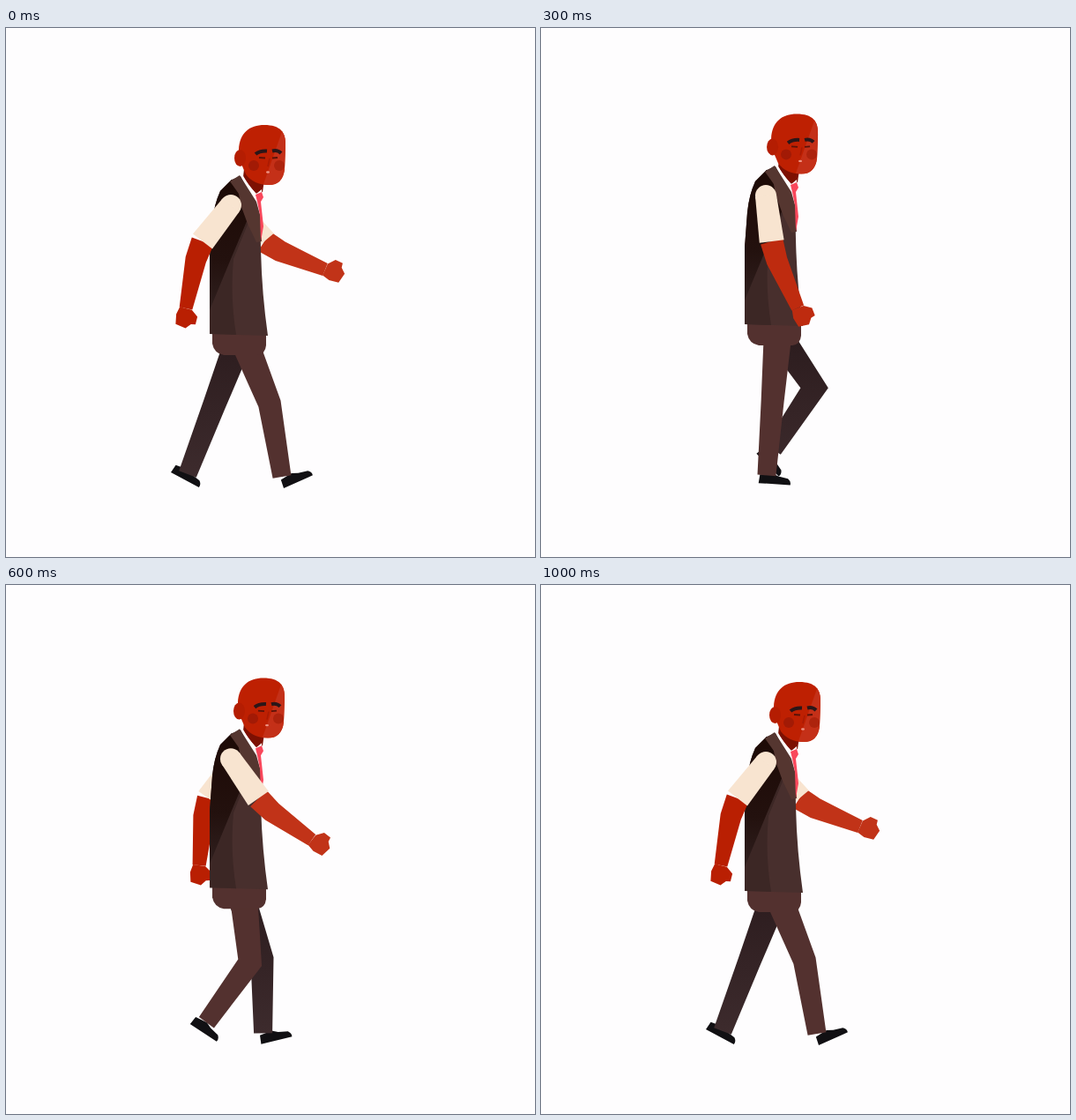
Recreate the animation shown at these times as an HTML page. Size 600x600 px, loop 1100 ms.

```html
<!DOCTYPE html>
<html lang="en">
<head>
<meta charset="utf-8">
<title>Walk cycle</title>
<style>
  html, body { margin: 0; width: 100%; height: 100%; overflow: hidden; background: #fefdfe; }
  svg { display: block; width: 100vw; height: 100vh; }
</style>
</head>
<body>
<svg viewBox="0 0 600 600">
  <defs>
    <linearGradient id="farCloth" gradientUnits="userSpaceOnUse" x1="0" y1="360" x2="0" y2="510">
      <stop offset="0" stop-color="#2d1d1f"/><stop offset="1" stop-color="#3d2b2d"/>
    </linearGradient>
    <linearGradient id="shade" gradientUnits="userSpaceOnUse" x1="0" y1="175" x2="0" y2="322">
      <stop offset="0" stop-color="#1d0a06"/><stop offset=".6" stop-color="#23110e"/><stop offset="1" stop-color="#30201f"/>
    </linearGradient>
    <clipPath id="skull"><use href="#headShape"/></clipPath>
  </defs>

  <g id="farArm"></g>
  <g id="farLeg" fill="url(#farCloth)"></g>
  <g id="nearLeg" fill="#53312f"></g>

  <g id="torso">
    <path fill="#53312f" d="M234 346H295V360Q294 370 285 371H247Q236 369 234 358Z"/>
    <path fill="#7d1002" d="M270 160L293 172L291 186L283 188L269 169Z"/>
    <path fill="#fffdfd" d="M265 167L268 166L275 178L284 188L290 183L291 200L289 230L280 205Z"/>
    <path fill="#482f2d" d="M256 172L243 185Q236 200 234 220L231 260V347L297 349Q290 300 289 250L288 212L266 168Z"/>
    <path fill="#3c2725" d="M256 172L243 185L231 260V347L261 348Q254 305 258 262L276 218Z"/>
    <path fill="url(#shade)" d="M256 172L243 185Q236 200 234 220L231 260V320L255 262L274 217L266 192Z"/>
    <path fill="#553630" d="M254 174L265 167L284 197L289 215L290 242L284 243L274 222L266 200L264 188Z"/>
    <path fill="#f9475b" d="M283 189L290 186L292 192L289 197L292 225L289 242L288 212L285 197Z"/>
  </g>

  <g id="head">
    <path id="headShape" fill="#be2002" d="M264 138C265 119 276 110 293 110C311 110 318 118 317 134L316 160Q314 178 298 178Q281 178 272 166L266 152Z"/>
    <ellipse cx="265.500" cy="147.500" rx="6.500" ry="9.500" fill="#b41d02"/>
    <g clip-path="url(#skull)">
      <path fill="#c43018" d="M315 112L291 180H325V112Z"/>
      <circle cx="281" cy="156" r="6" fill="#a21a05"/>
      <circle cx="310" cy="156" r="6" fill="#ad230d"/>
    </g>
    <path fill="none" stroke="#2b1618" stroke-width="4" d="M283 143Q288 139 296 139.500M302 139.500Q308 138 312 142"/>
    <path fill="none" stroke="#5a1208" stroke-width="1.800" d="M287 147L294 147.500M302 147.500L308 147"/>
    <path fill="none" stroke="#a81a04" stroke-width="1.500" d="M299 148L297 157"/>
    <ellipse cx="297" cy="163.500" rx="2" ry="1.200" fill="#ee9484"/>
  </g>

  <g id="nearArm"></g>
</svg>
<script>
const STEP = 100, LOOP = 1100, STEPS = 10;
const THIGH = 80, SHIN = 84;
const { PI, sin, cos, max, min, hypot, sqrt } = Math;
const $ = id => document.getElementById(id);

const fist = [[0, -7], [9, -9], [20, -7], [22, 5], [16, 10], [15, 15], [6, 15], [0, 7]];

const path = points => "M" + points.map(p => p.map(n => n.toFixed(1)).join(" ")).join("L") + "Z";

function normal([ax, ay], [bx, by]) {
  const len = hypot(bx - ax, by - ay);
  return [(by - ay) / len, (ax - bx) / len];
}

// Tapered outline through joints, mitred at the bends
function limb(joints, halfWidths) {
  const left = [], right = [], last = joints.length - 1;
  joints.forEach((p, i) => {
    const a = max(i - 1, 0), b = min(i, last - 1);
    const before = normal(joints[a], joints[a + 1]);
    const after = normal(joints[b], joints[b + 1]);
    const scale = halfWidths[i] / (1 + before[0] * after[0] + before[1] * after[1]);
    const dx = (before[0] + after[0]) * scale, dy = (before[1] + after[1]) * scale;
    right.push([p[0] + dx, p[1] + dy]);
    left.unshift([p[0] - dx, p[1] - dy]);
  });
  return path(right.concat(left));
}

// Two-bone solution with the knee bending forward
function kneeBetween(hip, ankle) {
  const dx = ankle[0] - hip[0], dy = ankle[1] - hip[1], dist = hypot(dx, dy);
  const reach = dist < THIGH + SHIN
    ? (dist * dist + THIGH * THIGH - SHIN * SHIN) / (2 * dist)
    : dist * THIGH / (THIGH + SHIN);
  const bend = sqrt(max(0, THIGH * THIGH - reach * reach)) * (dist < THIGH + SHIN);
  return [hip[0] + (dx * reach + dy * bend) / dist, hip[1] + (dy * reach - dx * bend) / dist];
}

// Turn 0 plants the heel in front, 0.5 pushes off behind, then the foot swings forward
function drawLeg(group, hip, turn) {
  const back = 1 - Math.abs(1 - 2 * turn);
  const swing = turn > 0.5 ? sin(2 * PI * turn) ** 2 : 0;
  const ankle = [313 - 107 * back, 509 - 3 * back - 30 * swing];
  const heelX = ankle[0] + 2 - 21 * back - 11 * swing;
  const heelY = ankle[1] + 13 - 15 * back * back - 5 * swing;
  const angle = 52 * back - 24 + 46 * swing;
  group.innerHTML =
    `<path fill="#111013" transform="translate(${heelX} ${heelY}) rotate(${angle})" d="M0 0L1 -10L15 -12L22 -9L33 -7Q37 -4 36 0Z"/>` +
    `<path d="${limb([hip, kneeBetween(hip, ankle), ankle], [16, 13, 10.5])}"/>`;
}

function skinAt(x) {
  const k = min(1, max(0, (x - 225) / 110));
  return `rgb(${185 + 8 * k},${31 + 20 * k},${2 + 22 * k})`;
}

// Turn 0 is the forward end of the swing
function drawArm(group, shoulder, turn) {
  const reach = cos(2 * PI * turn);
  const elbow = [258 + 35 * reach, 242];
  const wrist = [283 + 79 * reach, 318 - 44 * max(0, reach) ** 2];
  const [nx, ny] = normal(elbow, wrist);
  const bulge = elbow.map((e, i) => e + 0.28 * (wrist[i] - e) - 2.5 * [nx, ny][i]);
  const hand = fist.map(([u, v]) => [wrist[0] - ny * u + nx * v, wrist[1] + nx * u + ny * v]);
  group.innerHTML =
    `<g fill="${skinAt(wrist[0])}"><path d="${limb([elbow, bulge, wrist], [13, 12, 7.5])}"/>` +
    `<path d="${path(hand)}"/></g>` +
    `<g fill="#f8e4d0"><circle cx="${shoulder[0]}" cy="${shoulder[1]}" r="12"/>` +
    `<path d="${limb([shoulder, elbow], [12, 14])}"/></g>`;
}

function draw(step) {
  // The first stride lags slightly behind the second
  const turn = step / STEPS - 0.035 * max(0, sin(2 * PI * step / STEPS));
  const opposite = (turn + 0.5) % 1;
  const dy = -11 * sin(2 * PI * turn) ** 2;
  $("torso").setAttribute("transform", `translate(0 ${dy})`);
  $("head").setAttribute("transform", `translate(${dy * 0.27} ${dy * 1.16})`);
  drawArm($("farArm"), [260, 203 + dy], turn);
  drawLeg($("farLeg"), [265, 352 + dy * 0.9], opposite);
  drawLeg($("nearLeg"), [269, 352 + dy * 0.9], turn);
  drawArm($("nearArm"), [255, 201 + dy], opposite);
}

let shown = -1;
function tick() {
  const step = Math.floor(performance.now() % LOOP / STEP) % STEPS;
  if (step !== shown) draw(shown = step);
  requestAnimationFrame(tick);
}
tick();
</script>
</body>
</html>
```
